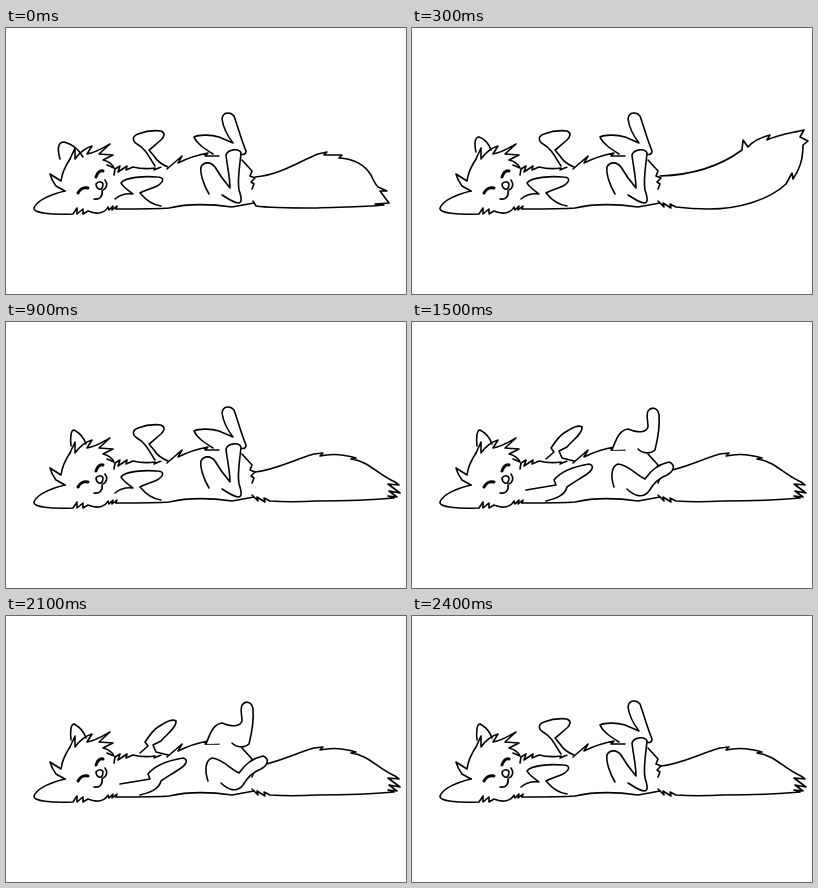
Recreate the animation shown at these times as an HTML page. Size 400 by 266 pixels, loop 3000 ms.

```html
<!DOCTYPE html>
<html lang="en">
<head>
<meta charset="utf-8">
<title>Wagging fox</title>
<style>
html, body { margin: 0; width: 100%; height: 100%; overflow: hidden; background: #fff; }
svg { display: block; width: 100%; height: 100%; }
path { fill: none; stroke: #000; stroke-width: 1.6; stroke-linecap: round; stroke-linejoin: round; }
.solid { fill: #fff; }
.eye { stroke-width: 3; }
</style>
</head>
<body>
<svg viewBox="0 0 400 266">
  <path id="tail"/>
  <path id="ear"/>
  <!-- head -->
  <path d="M59 163C46 166 31 172 28 180C27 185 45 187 67 186L71 180L71 186L77 181L77 186L82 183C91 187 99 185 102 179L103 182L107 178L106 182L111 178L110 181"/>
  <path d="M59 163L50 158C47 154 45 150 44 146L55 153C56 145 60 137 64 131"/>
  <path d="M64 131L69 120L69 131C74 124 79 120 86 118L81 126C89 125 97 120 104 116L93 126L107 127L97 132C102 133 106 136 108 140L101 137"/>
  <path class="eye" d="M72 165C74 161 78 159 82 160M90 149C91 145 94 142 97 143"/>
  <path d="M90 156C92 153 96 153 97 156C97 160 95 162 93 161C91 160 90 158 90 156M99 152C102 156 101 160 97 162M96 163C97 168 94 172 88 171"/>
  <!-- body -->
  <path d="M108 147L109 141L114 138L112 144L121 138L120 142L127 139C135 141 142 141 149 140L148 142L155 139M161 141L176 128L172 135C182 130 191 127 202 125L199 128L213 128"/>
  <path d="M110 181C125 181 151 181 163 180C184 175 205 176 226 179L248 175"/>
  <path id="rump"/>
  <path id="backArm" class="solid"/>
  <path id="backLeg" class="solid"/>
  <path id="frontArm" class="solid"/>
  <path id="frontLeg" class="solid"/>
</svg>
<script>
const tuft = "L258 176L259 180L251 175L252 179L246 173";

const tails = {
  low: "M249 149C274 147 294 133 312 126L321 124L318 127L336 127L333 130C350 131 360 139 365 147C368 154 370 157 372 159L381 163L374 163L383 175L369 176L378 177C360 179 338 179 311 180C287 180 263 180 250 178L247 173",
  mid: "M248 148C278 147 307 139 330 122L331 112L336 119C342 112 350 109 358 107L355 112C368 106 380 105 392 102L388 109L396 113L391 117C391 133 387 142 381 151L380 145L374 156C357 172 327 181 297 181C280 181 272 180 264 179" + tuft,
  high: "M247 145C278 144 302 135 314 122C321 114 322 107 321 98L324 106C328 94 338 82 349 72L341 87C354 80 366 76 376 69L373 79C380 85 382 99 379 111C378 118 376 122 372 129L376 126L371 133C366 147 353 162 339 169C322 178 284 181 264 179" + tuft,
  rest: "M249 150C269 148 287 138 308 132L317 131L314 134C327 131 337 132 350 136L345 137C363 139 372 153 389 160L393 163L382 162L394 171L383 169L391 175L382 174L388 176C367 178 337 179 311 179C294 180 278 180 264 179" + tuft
};

const ears = {
  low: "M54 131C51 121 52 114 58 114C67 116 73 122 77 129",
  mid: "M64 124C62 115 63 109 67 109C73 111 77 116 79 122",
  high: "M85 118C87 114 90 110 93 111L97 119",
  rest: "M65 124C64 115 65 108 68 108C74 111 78 116 80 122"
};

const rump = "M236 132L246 143L244 148L249 150L245 154L248 156L246 161";

const limbs = {
  curled: {
    rump,
    backArm: "M149 138C143 129 140 121 131 116C126 113 126 108 132 106C140 103 147 102 155 103C160 105 158 109 155 112C150 116 146 120 143 122L148 128C151 133 157 137 162 139",
    backLeg: "M207 126C199 121 191 116 188 109C194 106 206 107 213 109L227 115C220 106 217 98 216 91C217 83 225 84 228 88C232 99 235 111 240 123C240 127 237 127 233 126",
    frontArm: "M109 171C114 167 120 165 127 166C122 162 117 159 115 155C119 149 139 148 151 149C159 149 158 154 151 158C145 161 139 162 134 165C139 171 146 177 155 178",
    frontLeg: "M203 166C197 156 194 145 195 139C198 133 205 134 209 139C213 146 218 153 224 160C224 149 221 137 220 127C222 121 233 120 235 125C234 137 231 152 233 162C235 168 237 175 232 175C226 174 221 170 216 167"
  },
  half: {
    rump,
    backArm: "M134 137L142 130L139 126C143 120 147 114 152 111C159 107 166 102 170 105C171 111 160 119 155 125L147 129L150 136L162 139",
    backLeg: "M200 128C204 118 207 108 216 107C226 111 234 111 236 105C236 99 234 94 236 89C240 84 246 86 247 93C248 105 246 116 243 128C239 132 231 132 226 127",
    frontArm: "M114 168L144 163L142 158C150 148 165 144 177 142C184 144 179 150 172 154C166 158 159 162 155 165C153 174 142 177 134 179",
    frontLeg: "M202 165C198 153 200 144 206 142C217 143 224 153 233 157C239 148 248 142 257 140C264 143 262 149 255 153C247 156 241 162 237 169C231 177 222 174 215 167"
  },
  straight: {
    rump: "M235 131L242 135L236 140L243 144L237 149",
    backArm: "M128 138C138 131 145 119 154 114C166 111 176 103 188 98C195 98 191 105 184 109C176 116 168 120 161 125L150 140",
    backLeg: "M200 128C207 119 213 113 222 110C237 114 247 104 258 96C266 91 273 87 273 94C271 105 261 112 254 121C246 128 240 132 226 127",
    frontArm: "M123 161C137 158 151 150 163 146C174 142 186 136 194 136C200 139 187 145 181 149C168 158 158 167 146 172C136 176 127 178 117 178",
    frontLeg: "M218 152C226 156 233 159 241 157C237 153 238 149 244 148C258 149 269 146 280 145C288 146 288 153 282 156C276 158 270 157 262 158L271 163L265 165C265 172 257 173 248 178"
  }
};

// start time, tail and ear position, limb position
const steps = [
  [0, "low", "curled"], [300, "mid", "curled"], [600, "high", "curled"],
  [900, "rest", "curled"], [1500, "rest", "half"], [1800, "rest", "straight"],
  [2100, "rest", "half"], [2400, "rest", "curled"]
];

let shown;
function draw(now) {
  const step = steps.findLast(s => s[0] <= now % 3000);
  if (step !== shown) {
    const [, wag, pose] = shown = step;
    const shapes = { tail: tails[wag], ear: ears[wag], ...limbs[pose] };
    for (const id in shapes) document.getElementById(id).setAttribute("d", shapes[id]);
  }
  requestAnimationFrame(draw);
}
draw(performance.now());
</script>
</body>
</html>
```
